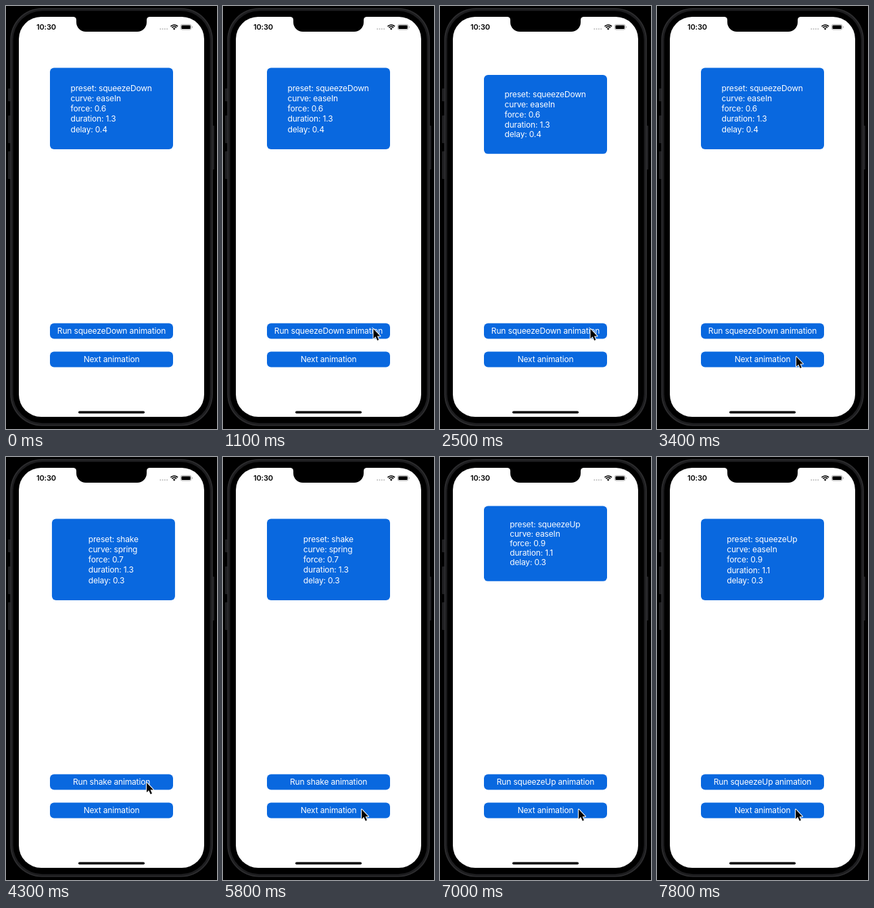
An HTML page with a canvas that plays this animation: 312 by 626 pixels, repeating every 8 s.

```html
<!DOCTYPE html>
<html lang="en">
<head>
<meta charset="utf-8">
<title>Preset animations</title>
<style>
  html, body { margin: 0; width: 100%; height: 100%; overflow: hidden; background: #000; }
  canvas { display: block; width: 312px; height: 626px; }
</style>
</head>
<body>
<canvas id="stage"></canvas>
<script>
const W = 312, H = 626, LOOP = 8000, STEP = 100;
const BLUE = '#0968df';
const POINT = 274 / 390; // stage pixels per screen point
const canvas = document.getElementById('stage');
const ctx = canvas.getContext('2d');
const ratio = window.devicePixelRatio || 1;
canvas.width = W * ratio;
canvas.height = H * ratio;

const CARD = { cx: 156, cy: 151.7, w: 182, h: 120.6 };

const squeezeDown = { name: 'squeezeDown', curve: 'easeIn', force: 0.6, duration: 1.3, delay: 0.4, left: 95.5, dir: -1 };
const shake = { name: 'shake', curve: 'spring', force: 0.7, duration: 1.3, delay: 0.3, left: 118.8 };
const squeezeUp = { name: 'squeezeUp', curve: 'easeIn', force: 0.9, duration: 1.1, delay: 0.3, left: 103.2, dir: 1 };

const SHOW_SHAKE = 3600, SHOW_UP = 6100;
const JUMP_DOWN = 1400, START_DOWN = 1830;
const START_SHAKE = 3991;
const JUMP_UP = 6200, START_UP = 6516;

// Pointer stops: time, x, y
const POINTER = [
  [400, 262, 630], [1100, 222, 477.5], [3100, 222, 477.5], [3450, 204.5, 521],
  [3750, 204.5, 521], [4200, 207.5, 481.5], [5300, 207.5, 481.5], [5600, 204.5, 521]
];

const lerp = (a, b, p) => a + (b - a) * p;
const smooth = p => p * p * (3 - 2 * p);

// Remaining distance of a damped spring, 1 at the start and 0 at rest
function spring(sec, duration) {
  if (sec <= 0) return 1;
  const damping = 0.7;
  const omega = Math.log(1000) / (damping * duration);
  const root = Math.sqrt(1 - damping * damping);
  const a = omega * root * sec;
  return Math.exp(-damping * omega * sec) * (Math.cos(a) + damping / root * Math.sin(a));
}

function bezier(x, x1, y1, x2, y2) {
  const at = (s, a, b) => 3 * (1 - s) ** 2 * s * a + 3 * (1 - s) * s * s * b + s ** 3;
  let lo = 0, hi = 1;
  for (let i = 0; i < 30; i++) {
    const mid = (lo + hi) / 2;
    if (at(mid, x1, x2) < x) lo = mid; else hi = mid;
  }
  return at(lo, y1, y2);
}

function shakeOffset(t) {
  const p = (t - START_SHAKE) / (shake.duration * 1000);
  if (p <= 0 || p >= 1) return 0;
  const keys = [0, 1, -1, 1, 0];
  const pos = bezier(p, 0.5, 1.1 + shake.force / 3, 1, 1) * 5;
  const i = Math.floor(pos);
  if (i > 3) return 0;
  return lerp(keys[i], keys[i + 1], pos - i) * 30 * shake.force * POINT;
}

function squeezePose(preset, q) {
  const peak = 3 * preset.force;
  return {
    x: 0,
    y: preset.dir * 300 * preset.force * peak * POINT * q,
    sy: 1 + (peak - 1) * q
  };
}

function cardPose(t) {
  if (t >= JUMP_UP) return squeezePose(squeezeUp, spring((t - START_UP) / 1000, squeezeUp.duration));
  if (t >= SHOW_SHAKE) return { x: shakeOffset(t), y: 0, sy: 1 };
  if (t >= JUMP_DOWN) return squeezePose(squeezeDown, spring((t - START_DOWN) / 1000, squeezeDown.duration));
  return { x: 0, y: 0, sy: 1 };
}

function pointerAt(t) {
  if (t < POINTER[0][0]) return null;
  for (let i = 1; i < POINTER.length; i++) {
    const [t0, x0, y0] = POINTER[i - 1], [t1, x1, y1] = POINTER[i];
    if (t < t1) {
      const p = smooth((t - t0) / (t1 - t0));
      return [lerp(x0, x1, p), lerp(y0, y1, p)];
    }
  }
  return POINTER[POINTER.length - 1].slice(1);
}

function box(x, y, w, h, r, color) {
  ctx.beginPath();
  ctx.roundRect(x, y, w, h, r);
  ctx.fillStyle = color;
  ctx.fill();
}

function label(text, x, y, { size = 12, weight = 400, color = '#fff', align = 'left' } = {}) {
  ctx.font = `${weight} ${size}px Inter, Roboto, sans-serif`;
  ctx.letterSpacing = '-0.16px';
  ctx.textAlign = align;
  ctx.fillStyle = color;
  ctx.fillText(text, x, y);
}

function drawPhone() {
  const side = '#202022';
  box(3, 122, 6, 19, 1, side);
  box(3, 162, 6, 41, 1, side);
  box(3, 215, 6, 41, 1, side);
  box(303, 177, 5, 65, 1, side);
  box(6.3, 3, 299.6, 618.5, 47, '#2d2d2f');
  box(8, 4.6, 296.2, 615.3, 45.5, '#1d1d1f');
  box(10.6, 7.2, 291, 610, 43, '#000');
}

function drawCard(preset, pose) {
  ctx.save();
  ctx.translate(CARD.cx + pose.x, CARD.cy + pose.y);
  ctx.scale(1, pose.sy);
  ctx.translate(-CARD.cx, -CARD.cy);
  box(CARD.cx - CARD.w / 2, CARD.cy - CARD.h / 2, CARD.w, CARD.h, 6, BLUE);
  const lines = [`preset: ${preset.name}`];
  for (const key of ['curve', 'force', 'duration', 'delay']) lines.push(`${key}: ${preset[key]}`);
  lines.forEach((line, i) => label(line, preset.left, 125.7 + i * 15.25));
  ctx.restore();
}

function drawButton(text, y) {
  box(65, y, 182, 23, 6, BLUE);
  label(text, 156, y + 15.8, { align: 'center' });
}

function drawStatus() {
  label('10:30', 45, 35.4, { size: 11, weight: 600, color: '#000' });
  ctx.fillStyle = '#bbb';
  for (let i = 0; i < 4; i++) {
    ctx.beginPath();
    ctx.arc(228.3 + i * 3.3, 34, 1, 0, 7);
    ctx.fill();
  }
  // Wi-Fi
  ctx.strokeStyle = '#000';
  ctx.lineWidth = 1.7;
  for (const r of [4.5, 7.2]) {
    ctx.beginPath();
    ctx.arc(248.7, 35.2, r, -Math.PI * 0.76, -Math.PI * 0.24);
    ctx.stroke();
  }
  ctx.beginPath();
  ctx.moveTo(248.7, 35.4);
  ctx.arc(248.7, 35.2, 2.5, -Math.PI * 0.76, -Math.PI * 0.24);
  ctx.fillStyle = '#000';
  ctx.fill();
  // Battery
  ctx.beginPath();
  ctx.roundRect(258.3, 27.3, 15.6, 7.8, 2.3);
  ctx.strokeStyle = '#999';
  ctx.lineWidth = 0.7;
  ctx.stroke();
  box(259.4, 28.4, 13.4, 5.6, 1.3, '#000');
  box(274.8, 29.9, 0.9, 2.6, 0.4, '#999');
}

function drawNotch() {
  ctx.beginPath();
  ctx.moveTo(99, 15);
  ctx.lineTo(99, 16);
  ctx.quadraticCurveTo(104, 16, 104, 21);
  ctx.lineTo(104, 24);
  ctx.arcTo(104, 38, 118, 38, 14);
  ctx.lineTo(194, 38);
  ctx.arcTo(208, 38, 208, 24, 14);
  ctx.lineTo(208, 21);
  ctx.quadraticCurveTo(208, 16, 213, 16);
  ctx.lineTo(213, 15);
  ctx.closePath();
  ctx.fillStyle = '#000';
  ctx.fill();
}

function drawPointer(x, y) {
  ctx.save();
  ctx.translate(x, y);
  ctx.beginPath();
  ctx.moveTo(0.5, 0.5);
  for (const [px, py] of [[0.5, 14.8], [3.7, 11.8], [6.2, 17.4], [8.4, 16.4], [6, 11], [10.4, 11]]) ctx.lineTo(px, py);
  ctx.closePath();
  ctx.lineJoin = 'round';
  ctx.strokeStyle = '#fff';
  ctx.lineWidth = 2;
  ctx.stroke();
  ctx.fillStyle = '#000';
  ctx.fill();
  ctx.restore();
}

function draw(t) {
  const preset = t >= SHOW_UP ? squeezeUp : t >= SHOW_SHAKE ? shake : squeezeDown;
  ctx.setTransform(ratio, 0, 0, ratio, 0, 0);
  ctx.fillStyle = '#000';
  ctx.fillRect(0, 0, W, H);
  drawPhone();

  ctx.save();
  box(19, 16, 274, 592, 33, '#fff');
  ctx.clip();
  drawCard(preset, cardPose(t));
  drawButton(`Run ${preset.name} animation`, 469.4);
  drawButton('Next animation', 511.5);
  drawStatus();
  box(107, 599.6, 98, 3.4, 1.7, '#000');
  ctx.restore();

  drawNotch();
  const pointer = pointerAt(t);
  if (pointer) drawPointer(...pointer);
}

// The picture advances ten times a second
function tick() {
  const t = performance.now() % LOOP;
  draw(Math.min(Math.floor(t / STEP) * STEP, LOOP - 2 * STEP));
  requestAnimationFrame(tick);
}
tick();
</script>
</body>
</html>
```
